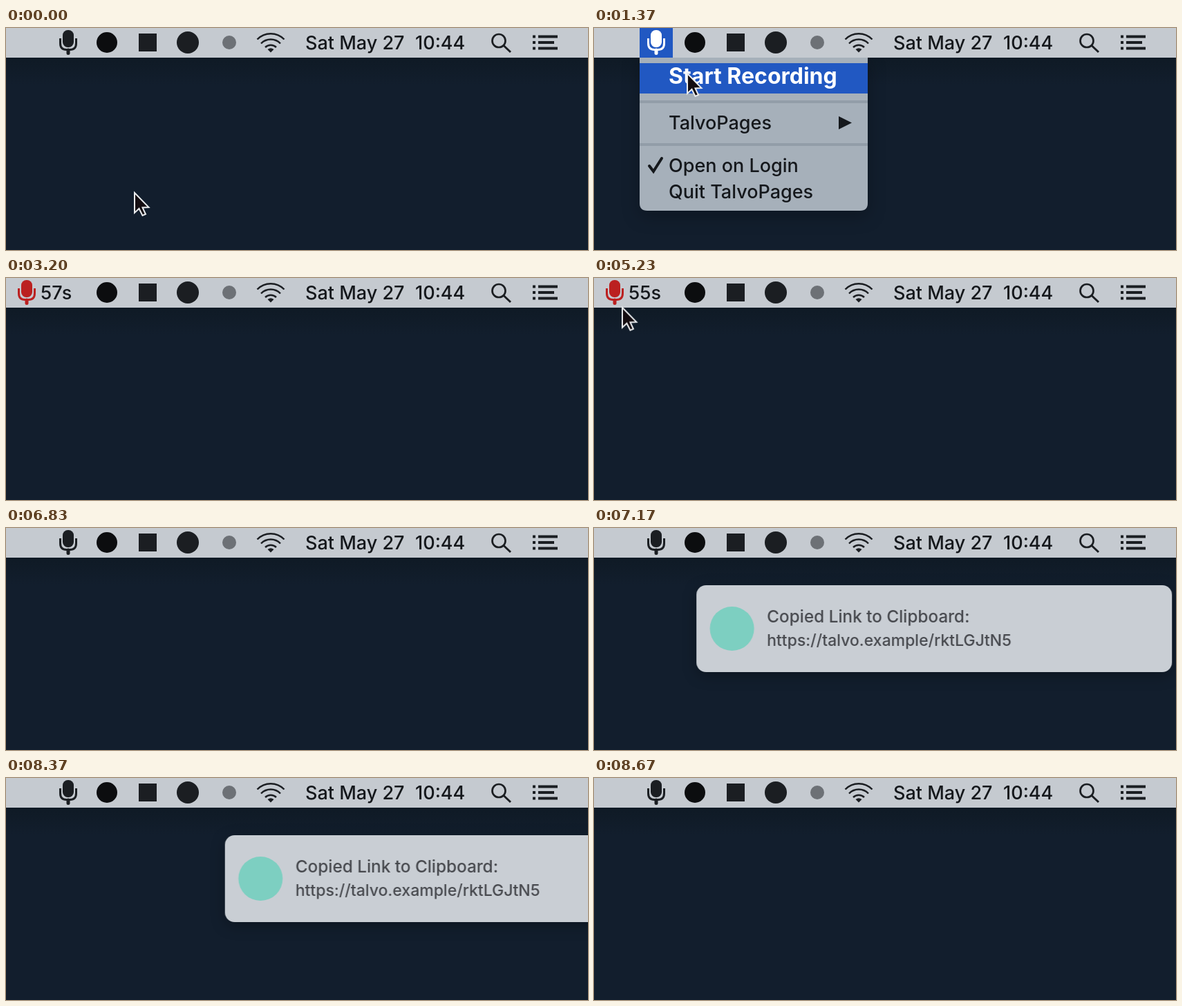
An HTML page for the animation above (8.73 s loop, 842x322 px).

```html
<!DOCTYPE html>
<html lang="en">
<head>
<meta charset="utf-8">
<title>Menu bar recorder</title>
<style>
  html, body { margin: 0; width: 100%; height: 100%; overflow: hidden; background: #121e2d; }
  svg { display: block; width: 100vw; height: 100vh; }
  text { font: 500 27px Inter, "Open Sans", sans-serif; fill: #15181c; white-space: pre; }
  .strong { font-size: 32px; font-weight: 700; }
  .title { font-size: 24.3px; fill: #47494e; }
  .link { font-size: 23px; fill: #47494e; }
  .line { fill: none; stroke: #1b1e22; stroke-width: 3; }
  .light { fill: #fff; }

  .idle, .active, .recording, .digits, .hot, .menu, .cursor, .banner { animation: 8730ms linear infinite; }
  .idle, .active, .recording, .digits, .hot { animation-timing-function: step-end; }
  .idle { animation-name: idle; }
  .active { animation-name: active; }
  .recording { animation-name: recording; }
  .digits { animation-name: digits; }
  .hot { animation-name: hot; }
  .menu { animation-name: menu; filter: drop-shadow(0 8px 12px rgba(0, 0, 0, .25)); }
  .cursor { animation-name: cursor; }
  .banner { animation-name: banner; filter: drop-shadow(0 5px 10px rgba(0, 0, 0, .3)); }

  @keyframes idle {
    0%, 64.49%, 100% { opacity: 1; }
    9.164% { opacity: 0; }
  }
  @keyframes active {
    0%, 21.76%, 100% { opacity: 0; }
    9.164% { opacity: 1; }
  }
  @keyframes recording {
    0%, 64.49%, 100% { opacity: 0; }
    21.76% { opacity: 1; }
  }
  @keyframes digits {
    0% { transform: none; }
    25.2% { transform: translateY(-43px); }
    36.65% { transform: translateY(-86px); }
    48.11% { transform: translateY(-129px); }
    59.56%, 100% { transform: translateY(-172px); }
  }
  @keyframes hot {
    0%, 19.13%, 100% { opacity: 0; }
    14.09%, 19.93% { opacity: 1; }
  }
  @keyframes menu {
    0%, 23.48%, 100% { opacity: 0; }
    9.16% { opacity: 0; animation-timing-function: step-end; }
    9.164%, 20.96% { opacity: 1; }
  }
  @keyframes cursor {
    0%, .344% { transform: translate(186px, 239px); animation-timing-function: cubic-bezier(.4, 0, .4, 1); }
    6.873%, 11.6% { transform: translate(88px, 16px); animation-timing-function: ease-in-out; }
    15.69%, 22.34% { transform: translate(135px, 66px); animation-timing-function: ease-in-out; }
    28.41% { transform: translate(860px, 250px); animation-timing-function: step-end; }
    54.98% { transform: translate(850px, 300px); animation-timing-function: cubic-bezier(.3, .2, .4, 1); }
    59.91% { transform: translate(41px, 43px); animation-timing-function: ease-out; }
    62.2%, 66.9% { transform: translate(27px, 15px); animation-timing-function: ease-in; }
    67.93%, 100% { transform: translate(860px, 258px); }
  }
  @keyframes banner {
    0%, 78.69% { transform: translateX(760px); animation-timing-function: cubic-bezier(.2, .5, .3, 1); }
    83.62%, 93.24% { transform: none; animation-timing-function: cubic-bezier(.4, 0, .8, .8); }
    99.31%, 100% { transform: translateX(760px); }
  }
</style>
</head>
<body>
<svg viewBox="0 0 842 322" preserveAspectRatio="none">
  <defs>
    <g id="mic">
      <rect x="-8" y="3" width="16" height="25" rx="7.500" fill="currentColor"/>
      <path d="M-11.500 15v7q0 9.500 9 9.500h5q9 0 9-9.500v-7" fill="none" stroke="currentColor" stroke-width="3"/>
      <path d="M0 32v4.500" stroke="currentColor" stroke-width="5" stroke-linecap="round"/>
    </g>
    <clipPath id="barClip"><rect width="842" height="43"/></clipPath>
    <linearGradient id="shade" x2="0" y2="1">
      <stop stop-color="#0f1a25"/>
      <stop offset="1" stop-color="#121e2d"/>
    </linearGradient>
  </defs>

  <rect width="842" height="322" fill="#121e2d"/>
  <rect y="43" width="842" height="40" fill="url(#shade)"/>

  <g class="menu">
    <path d="M66 40H396V254q0 11-11 11H77q-11 0-11-11z" fill="#a6b0ba"/>
    <path d="M66 107H396M66 169H396" stroke="#929da8" stroke-width="4"/>
    <text class="strong" x="108" y="81">Start Recording</text>
    <g class="hot">
      <rect x="66" y="51" width="330" height="44" fill="#2158c2"/>
      <text class="strong light" x="108" y="81">Start Recording</text>
    </g>
    <text x="108" y="147">TalvoPages</text>
    <path d="M354 128l19 9.500-19 9.500z" fill="#15181c"/>
    <path d="M80 200l6 8 12-19" fill="none" stroke="#15181c" stroke-width="4" stroke-linecap="round"/>
    <text x="108" y="209">Open on Login</text>
    <text x="108" y="247">Quit TalvoPages</text>
  </g>

  <g class="banner">
    <rect x="119" y="83" width="688" height="126" rx="14" fill="#c9ced4"/>
    <circle cx="170.500" cy="146" r="32" fill="#7dcfc1"/>
    <text class="title" x="221" y="137">Copied Link to Clipboard:</text>
    <text class="link" x="221" y="171">https://talvo.example/rktLGJtN5</text>
  </g>

  <rect width="842" height="43" fill="#c5cad0"/>
  <use class="idle" href="#mic" x="90" color="#1b1e22"/>
  <g class="active">
    <rect x="66" width="48" height="43" fill="#2158c2"/>
    <use href="#mic" x="90" color="#fff"/>
  </g>
  <g class="recording">
    <use href="#mic" x="30" color="#bb2020"/>
    <g clip-path="url(#barClip)">
      <g class="digits">
        <text x="50" y="31">59s</text>
        <text x="50" y="74">58s</text>
        <text x="50" y="117">57s</text>
        <text x="50" y="160">56s</text>
        <text x="50" y="203">55s</text>
      </g>
    </g>
  </g>

  <circle cx="146" cy="21" r="15" fill="#0c0d0f"/>
  <rect x="192" y="8" width="26" height="26" fill="#1b1e22"/>
  <circle cx="263" cy="21" r="16" fill="#1b1e22"/>
  <circle cx="323" cy="21" r="10" fill="#6d7176"/>
  <g class="line">
    <path d="M363.500 16.500a27 27 0 0 1 39 0M369 22.500a19.500 19.500 0 0 1 28 0M375 28a11.500 11.500 0 0 1 16 0" stroke-width="2.500"/>
    <circle cx="713" cy="18.500" r="9.500" stroke-width="2.700"/>
    <path d="M720 25.500l10 9.500"/>
    <path d="M762 12.500h4M770 12.500h28M762 21h4M770 21h23M762 29.500h4M770 29.500h28" stroke-width="4"/>
  </g>
  <path d="M383 35.500l-4.500-4.500q4.500-3.500 9 0z" fill="#1b1e22"/>
  <text x="433" y="31">Sat May 27</text>
  <text x="592" y="31">10:44</text>

  <path class="cursor" d="M0 0V29L6.500 23L11.500 33L16 31L11.500 21.500L20.500 21z"
        fill="#140d11" stroke="#e9ebed" stroke-width="2"/>
</svg>
</body>
</html>
```
